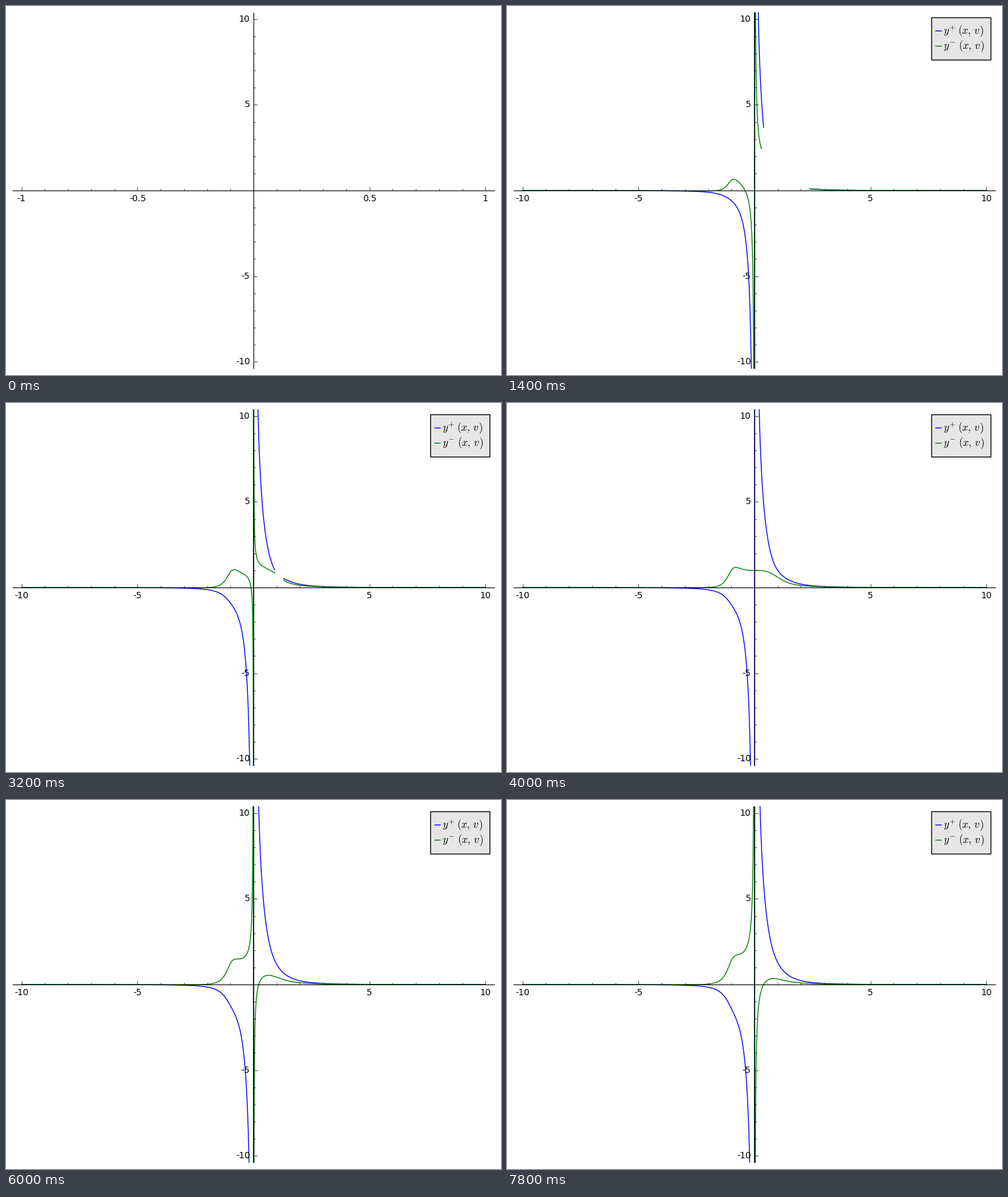
A matplotlib script that plays this animation: 784 by 584 pixels, repeating every 8 s.

```python
import numpy as np
import matplotlib.pyplot as plt
from matplotlib.animation import FuncAnimation
from matplotlib.patches import Rectangle

W, H, DPI = 784, 584, 100
CX, CY = 392, 292                # where the axes cross
SX, SY = 764 / 20.8, 564 / 20.8  # pixels per unit
PAD = 4 * DPI / 72               # tick length and label distance
FRAMES, INTERVAL = 40, 200

plt.rcParams["font.family"] = "DejaVu Sans"
plt.rcParams["mathtext.fontset"] = "cm"

fig = plt.figure(figsize=(W / DPI, H / DPI), dpi=DPI, facecolor="white")
ax = fig.add_axes([0, 0, 1, 1])
ax.set_xlim(0, W)
ax.set_ylim(H, 0)
ax.axis("off")


def segment(x0, y0, x1, y1, width=0.8, color="black", z=4):
    return ax.plot([x0, x1], [y0, y1], color=color, lw=width,
                   solid_capstyle="butt", zorder=z)[0]


def label(x, y, text, ha="center", va="baseline", size=10):
    return ax.text(x, y, text, ha=ha, va=va, fontsize=size, zorder=6)


def draw_axes():
    segment(10, CY, 774, CY)
    segment(CX, 10, CX, 574)
    for k in range(-10, 11):
        if k == 0:
            continue
        size = PAD if k % 5 == 0 else PAD / 2
        x, y = CX + k * SX, CY - k * SY
        segment(x, CY, x, CY - size, 0.5)
        segment(CX, y, CX + size, y, 0.5)
        if k % 5 == 0:
            label(CX - PAD, y, str(k), "right", "center")


def draw_legend():
    box = Rectangle((672.5, 18), 94, 67, fc="0.9", ec="black",
                    lw=1, zorder=5)
    parts = [ax.add_patch(box)]
    rows = [(39, "blue", "+", 714), (63, "green", "-", 715)]
    for y, color, sign, x in rows:
        parts.append(segment(678, y, 688, y, 1, color, 6))
        parts.append(label(691.5, y + 5.5, f"$y^{{{sign}}}$", "left", size=12))
        parts.append(label(x, y + 5.5, "$(x,\\,v)$", "left", size=12))
    return parts


def trim(x, ok, left_gap, right_gap):
    """Shorten each branch where it borders on the undefined region."""
    keep = ok.copy()
    for i in np.flatnonzero(ok[:-1] != ok[1:]):
        if ok[i]:
            keep &= ~((x > x[i] - left_gap) & (x <= x[i]))
        else:
            keep &= ~((x >= x[i + 1]) & (x < x[i + 1] + right_gap))
    return keep


X = 10 * np.linspace(-1, 1, 4000) ** 3  # dense around the pole, never 0


def branches(n):
    """Both roots y of (1 + x - x(1 + x^3) y)^2 + x^4 y^2 = w."""
    w = n / 20
    cube = 1 + X ** 3
    q = cube ** 2 + X ** 2
    b = (1 + X) * cube
    d = w * q - (X * (1 + X)) ** 2
    root = np.sqrt(np.maximum(d, 0))
    for sign, gap in ((1, 0.088), (-1, max(0.05, 0.264 - 0.012 * n))):
        y = np.clip((b + sign * root) / (X * q), -40, 40)
        yield np.where(trim(X, d >= 0, gap, 0.165), y, np.nan)


draw_axes()
legend = draw_legend()
x_labels = [(k, label(CX + k * SX, CY + PAD, "", va="top"))
            for k in (-10, -5, 5, 10)]

window = Rectangle((10, 10), 764, 564, transform=ax.transData)
curves = []
for tone, z in (("blue", 2), ("green", 3)):
    line, = ax.plot([], [], color=tone, lw=1, zorder=z)
    line.set_clip_path(window)
    curves.append(line)


def update(n):
    shown = n > 0
    for part in legend + curves:
        part.set_visible(shown)
    for k, text in x_labels:
        text.set_text(str(k) if shown else f"{k / 10:g}")
    if shown:
        for line, y in zip(curves, branches(n)):
            line.set_data(CX + SX * X, CY - SY * y)
    return curves


anim = FuncAnimation(fig, update, frames=FRAMES, interval=INTERVAL,
                     init_func=lambda: update(0), repeat=True,
                     repeat_delay=0, blit=False)
plt.show()
```
